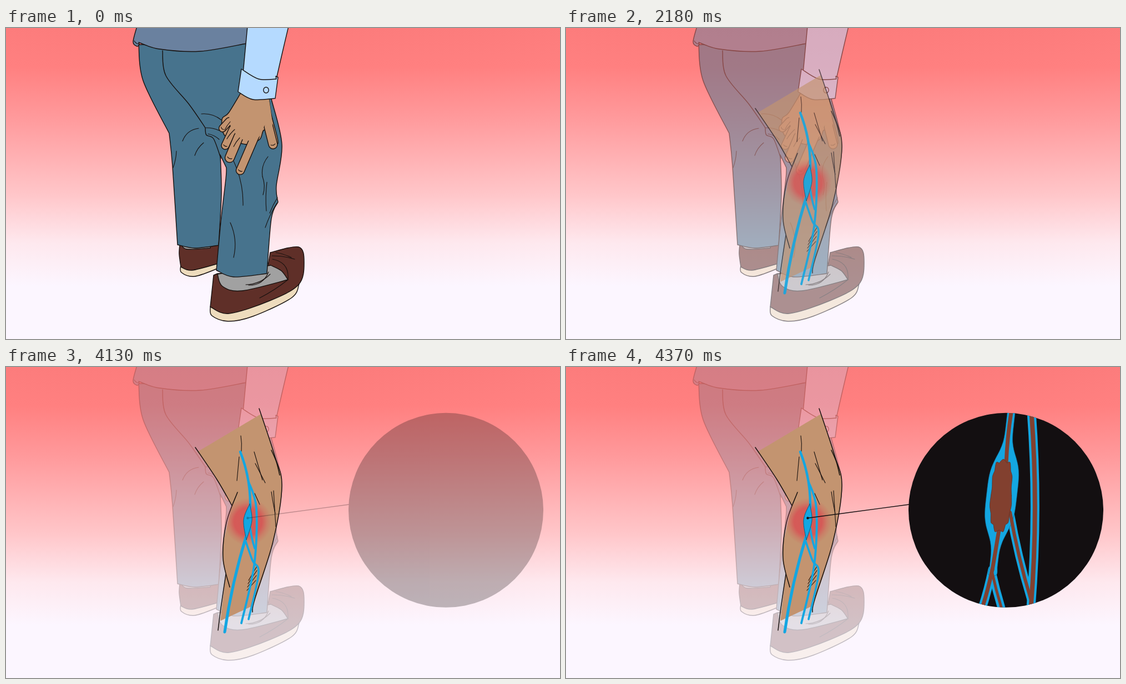
Recreate the animation shown at these times as an HTML page. Size 998 by 561 pixels, loop 5.94 s.

```html
<!DOCTYPE html>
<html lang="en">
<head>
<meta charset="utf-8">
<title>Leg pain</title>
<style>
html, body { margin: 0; width: 100%; height: 100%; overflow: hidden; background: #fcf6ff; }
svg { display: block; width: 100vw; height: 100vh; }
</style>
</head>
<body>
<svg viewBox="0 0 998 561" fill="none" stroke-linecap="round" stroke-linejoin="round">
  <defs>
    <linearGradient id="sky" gradientUnits="userSpaceOnUse" x1="0" y1="0" x2="0" y2="561">
      <stop offset="0" stop-color="#fc7c7c"/>
      <stop offset=".125" stop-color="#ff8080"/>
      <stop offset=".285" stop-color="#ff999b"/>
      <stop offset=".535" stop-color="#ffc6c9"/>
      <stop offset=".69" stop-color="#fee8ee"/>
      <stop offset=".83" stop-color="#fcf6ff"/>
    </linearGradient>
    <radialGradient id="glow">
      <stop offset=".58" stop-color="#d85053" stop-opacity=".85"/>
      <stop offset=".8" stop-color="#d85053" stop-opacity=".3"/>
      <stop offset="1" stop-color="#d85053" stop-opacity="0"/>
    </radialGradient>
    <clipPath id="lens"><circle cx="792.5" cy="258.3" r="175.5"/></clipPath>
  </defs>
  <rect width="998" height="561" fill="url(#sky)"/>
  <g id="person"></g>
  <g id="limb"></g>
  <g id="vessels"><circle cx="436" cy="279" r="43" fill="url(#glow)"/></g>
  <g id="callout">
    <path d="M435.5 272.5L618 248" stroke="#130f11" stroke-width="1.3"/>
    <circle cx="435.5" cy="272.5" r="2.2" fill="#130f11"/>
    <circle cx="792.5" cy="258.3" r="175.5" fill="#130f11"/>
  </g>
  <g id="inside" clip-path="url(#lens)"></g>
</svg>
<script>
const INK = '#17110f', PANTS = '#47738d', SKIN = '#c39470', BROWN = '#5f2f28', SOCK = '#a1a1a1';
const CREAM = '#eedcbd', SHIRT = '#b5daff', BLUE = '#14a6e1', EDGE = '#0b5f86', CLOT = '#82402f';
const $ = id => document.getElementById(id);
let layer;

function path(d, fill, stroke, width) {
  const el = document.createElementNS('http://www.w3.org/2000/svg', 'path');
  Object.entries({ d, fill, stroke, 'stroke-width': width })
    .forEach(([k, v]) => el.setAttribute(k, v));
  layer.append(el);
}

// Smooth curve through points; "|" marks a corner.
function curve(text) {
  let d = '', last = null;
  for (const part of text.split('|')) {
    const p = part.trim().split(/\s+/).map(s => s.split(',').map(Number));
    if (last) p.unshift(last); else d = 'M' + p[0];
    for (let i = 0; i < p.length - 1; i++) {
      const a = p[i - 1] || p[i], b = p[i], c = p[i + 1], e = p[i + 2] || c;
      const h = [0, 1].map(k => b[k] + (c[k] - a[k]) / 6);
      const g = [0, 1].map(k => c[k] - (e[k] - b[k]) / 6);
      d += `C${h} ${g} ${c}`;
    }
    last = p[p.length - 1];
  }
  return d;
}

const shape = (fill, text, stroke = INK, width = 1.4) => path(curve(text) + 'Z', fill, stroke, width);
const line = (text, width = 1.4, stroke = INK) => path(curve(text), 'none', stroke, width);

// Single arc from (x, y) by (dx, dy), bowed sideways by a share of its length.
const arc = (x, y, dx, dy, bow = 0) =>
  `M${x} ${y}q${dx / 2 - dy * bow} ${dy / 2 + dx * bow} ${dx} ${dy}`;
const crease = (...a) => path(arc(...a), 'none', INK, 1.1);
const tube = (color, width, ...a) => path(arc(...a), 'none', color, width);

// Rounded finger with a nail at its tip.
function finger(x, y, dx, dy, width) {
  const d = arc(x, y, dx, dy), len = Math.hypot(dx, dy);
  path(d, 'none', INK, width + 1.4);
  path(d, 'none', SKIN, width - 1.4);
  const ux = dx / len * width, uy = dy / len * width;
  crease(x + dx - uy * .25, y + dy + ux * .25, uy * .5, -ux * .5, .35);
}

function drawShoes() {
  shape(CREAM, '315,428 316,441 340,448 381,434|381,420');
  shape(BROWN, '313,391 312,408 315,431|335,437 382,425|384,392');
  shape(SOCK, '315,390 326,399 368,397|368,390');

  shape(CREAM, '368,503 371,519 400,529 445,520 514,487 528,462|500,470');
  shape(BROWN, '374,446 368,503|402,515 475,492 527,463 537,423 527,395 476,405|470,440|381,443');
  shape(SOCK, '381,444 390,466 425,474 508,454|496,438 477,428');
  crease(473, 440, -36, 24, -.35);
  crease(476, 444, -44, 19, -.2);
  crease(479, 411, 41, 6, -.08);
  crease(486, 405, 28, 9, -.08);
  crease(480, 417, 28, 36, -.45);
  crease(508, 454, -51, 33, -.05);
}

function drawPants() {
  shape(PANTS, '239,30 247,95 294,190|300,250 309,391|340,397 383,392|388,300 386,228|440,215|432,28');
  const inner = '386,229 397,252|396,272 387,350 379,437', hem = '|410,449 470,443';
  const outer = '|478,344 490,314|487,285 497,210 478,128';
  shape(PANTS, '376,201 ' + inner + hem + outer + '|430,110', 'none');
  line(inner + hem + outer);
  line('282,41 288,86 330,138 359,180|361,193 374,200 387,235');
  crease(352, 155, 36, 11, -.2);
  crease(360, 180, 24, 5, -.12);
  crease(364, 191, 20, 10, -.15);
  crease(347, 181, -29, 23, .3);
  crease(356, 207, -16, 23, .15);
  crease(307, 222, -6, 30, -.08);
  crease(409, 238, 18, 82, -.12);
  crease(472, 232, -10, 36, .22);
  crease(462, 268, 1, 33, -.17);
  crease(470, 278, -1, 52, .05);
  crease(488, 316, -21, 44, .06);
  crease(489, 306, -14, 28, .05);
  crease(404, 351, 6, 63, -.17);
}

function drawTop() {
  shape('#6a819f', '236,-3 229,25 236,33 240,30|239,26|277,38 350,42 433,28|438,-3');
  crease(231, 23, 9, 6, .3);
}

function drawHand() {
  const palm = '423,117 401,153 389,165 395,195 433,210 457,201 466,184 490,208 478,156 474,128';
  shape(SKIN, palm);
  finger(402, 168, -12, 13, 13);
  finger(409, 182, -14, 30, 14);
  finger(419, 196, -16, 38, 17);
  finger(449, 194, -27, 63, 15);
  finger(473, 178, 8, 32, 16);
  shape(SKIN, '424,120 406,152 402,168 410,186 424,200 448,203 460,190 467,175 480,180 474,128', 'none');
  crease(404, 169, -10, 15, .08);
  crease(412, 183, -14, 17, .08);
  crease(421, 198, -11, 16, .08);
}

function drawSleeve() {
  shape(SHIRT, '435,-3 427,82|455,100|487,92|497,48 509,-3');
  shape(SHIRT, '424,74 418,115|445,129 485,127|490,89|486,87|487,92|455,92 424,74');
  path('M463.8 112a4.7 5.3 0 1 1 9.4 0a4.7 5.3 0 1 1 -9.4 0', 'none', INK, 1.4);
}

function drawLimb() {
  const thigh = '341,145 380,203 407,250';
  const side = '456,75 484,160 497,215 481,315 448,419 444,442';
  shape(SKIN, '345,153|459,85|484,160 497,215 481,315 446,430|386,458|396,375|390,330 407,250|380,203 345,153', 'none');
  [thigh, side, '417,226 397,281 391,345 403,397', '396,374 387,435 382,475', '478,150 487,171 493,195']
    .forEach(s => line(s, 1.5));
  crease(423, 124, 1, 28, -.06);
  crease(420, 162, -4, 43);
  crease(447, 153, 15, 51);
  crease(449, 174, 18, 35);
  crease(478, 225, 7, 39, .02);
  crease(482, 223, 4, 65);
  crease(448, 228, 9, 20);
  for (let i = 0; i < 4; i++) crease(453 - i, 358 + i * 9, -16, 27 - i * 3);
}

function drawVessels() {
  tube(BLUE, 3.6, 440, 290, 8, 37, .05);
  line('431,312 444,349 455,372 437,455', 3.6, BLUE);
  line('437,207 451,255 447,358 424,462', 3.8, BLUE);
  tube(BLUE, 4.4, 422, 153, 18, 101, -.1);
  tube(BLUE, 5, 434, 301, -40, 177, .04);
  shape(BLUE, '439,247 428,276 433,312|443,277 439,247', EDGE, 1);
}

// The vein is a leaning centre line whose width swells around the clot.
function swollenVein() {
  const left = [], right = [];
  for (let y = 75; y <= 375; y += 15) {
    const mid = 802 - .115 * (y - 83);
    const half = 7 + 20.5 * Math.exp(-(((y - 230) / 75) ** 4));
    left.push(`${mid - half},${y}`);
    right.unshift(`${mid + half},${y}`);
  }
  shape(BLUE, [...left, ...right].join(' '), EDGE, .6);
}

function clot() {
  const soft = v => Math.sign(v) * Math.abs(v) ** .75;
  const edge = [];
  for (let i = 0; i <= 44; i++) {
    const a = i / 44 * 2 * Math.PI;
    const r = 1 + .045 * Math.sin(11 * a) + .02 * Math.sin(5 * a);
    const y = 64 * r * soft(Math.sin(a));
    edge.push(`${784 - .06 * y + 18.5 * r * soft(Math.cos(a))},${232 + y}`);
  }
  shape(CLOT, edge.join(' '), '#5f2c22', .8);
}

function drawInside() {
  const runs = [
    [14, 6, 800, 262, 37, 156, .03],
    [15, 7, 768, 365, -20, 75, -.03],
    [14, 5, 767, 368, 19, 72, .02],
    [16, 8, 838, 75, -1, 365, -.04]
  ];
  runs.forEach(([wide, , ...a]) => tube(BLUE, wide, ...a));
  swollenVein();
  runs.forEach(([, thin, ...a]) => tube(CLOT, thin, ...a));
  tube(CLOT, 7, 803, 75, -10, 99, .03);
  tube(CLOT, 7, 781, 288, -13, 78);
  clot();
}

function paint(id, ...steps) {
  layer = $(id);
  steps.forEach(step => step());
}
paint('person', drawShoes, drawPants, drawTop, drawHand, drawSleeve);
paint('limb', drawLimb);
paint('vessels', drawVessels);
paint('inside', drawInside);

const LOOP = 5940, STEP = 30;
const clamp = v => Math.max(0, Math.min(1, v));
const fade = (t, start, count) => clamp((Math.floor((t - start) / STEP) + 1) / count);
const show = (id, alpha) => $(id).setAttribute('opacity', alpha);

function render(t) {
  const reveal = fade(t, 2030, 9);
  show('person', 1 - .74 * reveal);
  show('limb', reveal);
  show('vessels', 1 - (1 - reveal) ** 2);
  show('callout', fade(t, 4070, 11));
  show('inside', fade(t, 4250, 5));
}

function tick() {
  render(performance.now() % LOOP);
  requestAnimationFrame(tick);
}
tick();
</script>
</body>
</html>
```
